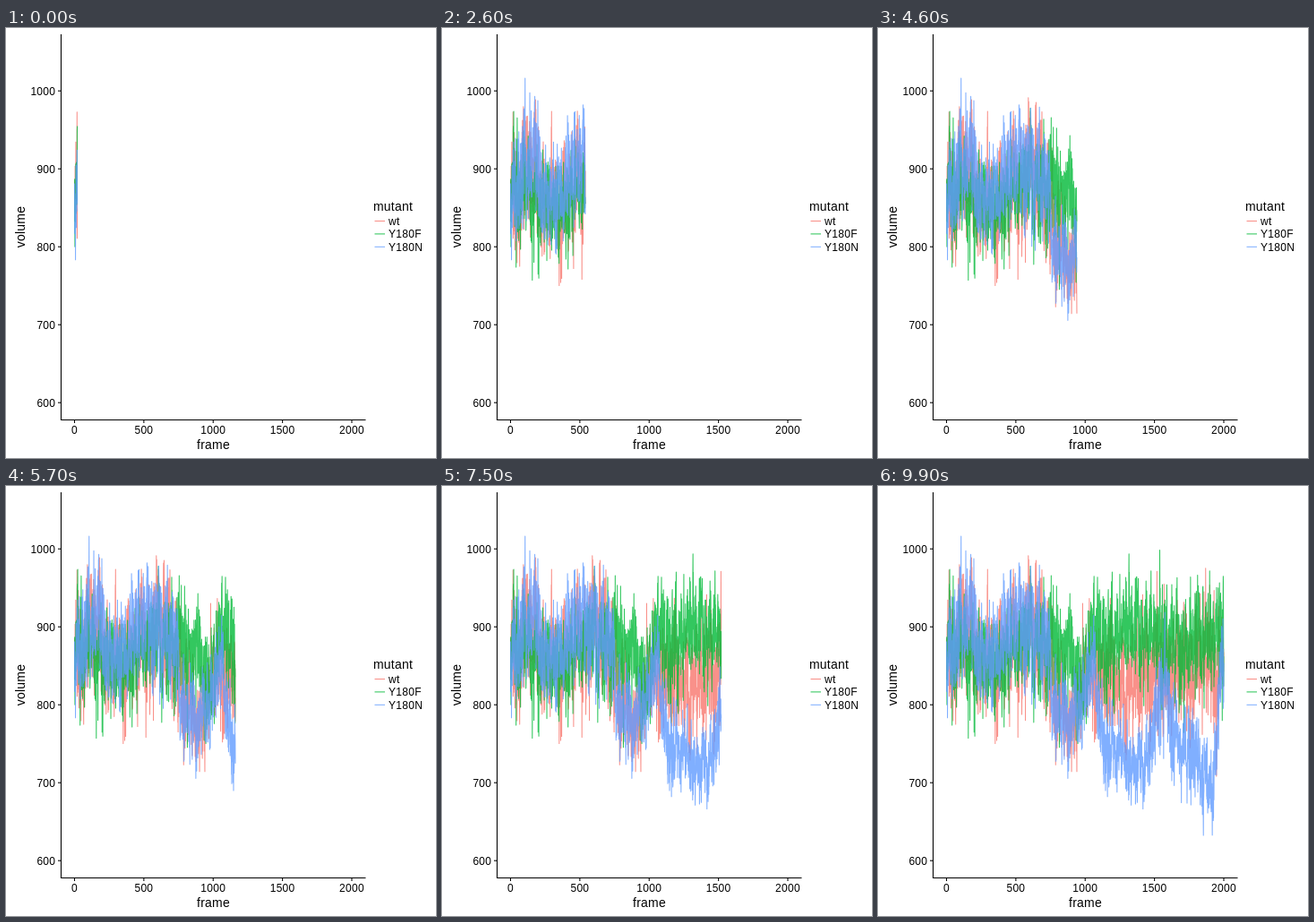
These frames come from a looping animation (480 px wide and 480 px high, 10 s). An HTML page:

```html
<!DOCTYPE html>
<html lang="en">
<head>
<meta charset="utf-8">
<title>Volume by mutant</title>
<style>
html, body { margin: 0; width: 100%; height: 100%; overflow: hidden; background: #fff; }
svg { display: block; width: 480px; height: 480px; }
text { font: 12px "Liberation Sans", Arial, sans-serif; letter-spacing: .3px; fill: #000; }
.title { font-size: 14px; letter-spacing: .2px; }
.axis { stroke: #000; stroke-width: 1.07; fill: none; }
.line { fill: none; stroke-width: 1.07; stroke-opacity: .8; stroke-linejoin: round; }
</style>
</head>
<body>
<svg id="plot" viewBox="0 0 480 480"></svg>
<script>
const STEP = 100, FRAMES = 100, PER_FRAME = 20;
const plot = document.getElementById('plot');
const px = v => 76.5 + v * 0.15475;
const py = v => 70.2 + (1000 - v) * 0.87;

// trend: a few [frame, mean volume] turning points, joined by straight lines
const series = [
  { name: 'wt', color: '#f8766d', seed: 11, spread: 43,
    trend: [[0, 875], [165, 895], [215, 855], [430, 860], [660, 900], [905, 765], [1000, 830], [2000, 850]] },
  { name: 'Y180F', color: '#00ba38', seed: 29, spread: 37,
    trend: [[0, 885], [315, 840], [590, 880], [890, 870], [975, 815], [1040, 885], [2000, 888]] },
  { name: 'Y180N', color: '#619cff', seed: 47, spread: 37,
    trend: [[0, 865], [100, 915], [310, 850], [450, 905], [640, 910], [750, 860], [790, 790], [900, 770],
      [1060, 835], [1120, 750], [1420, 712], [1570, 840], [1640, 755], [1925, 700], [1980, 840], [2000, 845]] }
];

function random(seed) {
  return () => {
    seed = seed + 0x6d2b79f5 | 0;
    let t = Math.imul(seed ^ seed >>> 15, 1 | seed);
    t = t + Math.imul(t ^ t >>> 7, 61 | t) ^ t;
    return ((t ^ t >>> 14) >>> 0) / 4294967296;
  };
}

function trendAt(trend, x) {
  const i = Math.max(1, trend.findIndex(([end]) => end >= x));
  const [x0, y0] = trend[i - 1], [x1, y1] = trend[i];
  return y0 + (y1 - y0) * (x - x0) / (x1 - x0);
}

// Noise mixes a slow drift with independent jitter and shrinks at low volume.
function makePoints({ trend, spread, seed }) {
  const rnd = random(seed);
  const gauss = () => (rnd() + rnd() + rnd() + rnd() - 2) * 1.732;
  let drift = 0;
  return Array.from({ length: FRAMES * PER_FRAME + 1 }, (_, x) => {
    drift = drift * 0.8 + gauss() * 0.6;
    const noise = drift * 0.55 + gauss() * 0.83;
    const mean = trendAt(trend, x);
    const value = mean + noise * spread * (mean - 300) / 600;
    return px(x).toFixed(2) + ',' + py(value).toFixed(2);
  });
}

function add(tag, attrs, text = '') {
  const el = document.createElementNS('http://www.w3.org/2000/svg', tag);
  for (const key in attrs) el.setAttribute(key, attrs[key]);
  el.textContent = text;
  return plot.appendChild(el);
}

for (const s of series) {
  s.points = makePoints(s);
  s.el = add('polyline', { class: 'line', stroke: s.color });
}

add('path', { class: 'axis', d: 'M61.5 7V437.5H401.5' });
for (let v = 600; v <= 1000; v += 100) {
  add('path', { class: 'axis', d: `M58 ${py(v)}h3.5` });
  add('text', { x: 55.3, y: py(v) + 4.4, 'text-anchor': 'end' }, v);
}
for (let v = 0; v <= 2000; v += 500) {
  add('path', { class: 'axis', d: `M${px(v)} 437.5v3.5` });
  add('text', { x: px(v), y: 453, 'text-anchor': 'middle' }, v);
}
add('text', { class: 'title', x: 231.5, y: 470, 'text-anchor': 'middle' }, 'frame');
add('text', { class: 'title', transform: 'translate(21 222) rotate(-90)', 'text-anchor': 'middle' }, 'volume');
add('text', { class: 'title', x: 410, y: 204 }, 'mutant');
series.forEach((s, i) => {
  const y = 215.5 + i * 14.4;
  add('path', { class: 'line', stroke: s.color, d: `M411.5 ${y}h11.5` });
  add('text', { x: 427, y: y + 4.4 }, s.name);
});

let shown = -1;
const start = performance.now();
function draw(now) {
  const frame = Math.floor(Math.max(0, now - start) / STEP) % FRAMES;
  if (frame !== shown) {
    shown = frame;
    const count = (frame + 1) * PER_FRAME + 1;
    for (const s of series) s.el.setAttribute('points', s.points.slice(0, count).join(' '));
  }
  requestAnimationFrame(draw);
}
draw(start);
</script>
</body>
</html>
```
